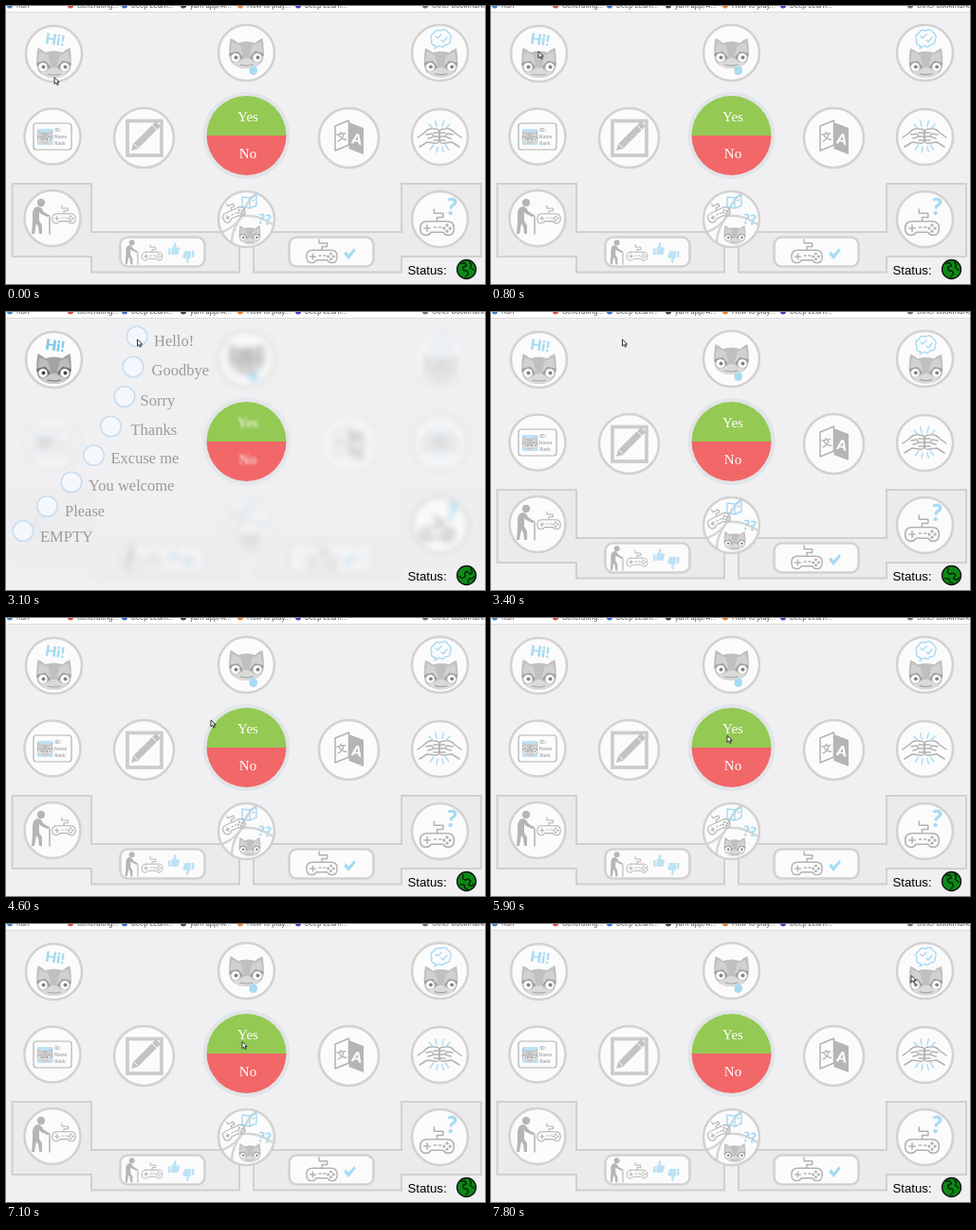
An HTML page for the animation above (8000 ms loop, 505 px wide and 294 px high).

```html
<!DOCTYPE html>
<html lang="en">
<head>
<meta charset="utf-8">
<title>Conversation board</title>
<style>
html, body { margin: 0; width: 100%; height: 100%; overflow: hidden; background: #f0f0f2; }
svg { display: block; width: 505px; height: 294px; }
.art { opacity: .65; }
.blurred .art { opacity: .8; }
.active .art { opacity: 1; }
.line { fill: none; stroke: #8c8c8c; stroke-width: 1.5; stroke-linecap: round; stroke-linejoin: round; }
.blue { fill: #7cc9ef; }
.blueLine { fill: none; stroke: #7cc9ef; stroke-width: 1.4; stroke-linecap: round; stroke-linejoin: round; }
.gray { fill: #909090; }
.ring { fill: #fbfbfb; stroke: #d2d2d2; stroke-width: 2.6; }
.panel { fill: #ebebed; stroke: #d0d0d0; stroke-width: 2; }
.menu { font: 16.5px "Liberation Serif", serif; fill: #9b9b9b; }
.menu circle { fill: #f4f7fb; stroke: #c8ddef; stroke-width: 1.5; }
.answer { font: 15px "Liberation Serif", serif; fill: #fff; text-anchor: middle; }
.bold { font-family: Lato, sans-serif; font-weight: 900; }
.glyph { font-family: "Noto Sans CJK SC", "Noto Sans CJK", sans-serif; font-weight: 700; fill: #909090; }
.white { fill: #fff; }
</style>
</head>
<body>
<svg viewBox="0 0 505 294">
  <defs>
    <g id="face">
      <path fill="#a2a2a2" d="M-17-16Q-12-14-9-11Q0-14 9-11Q12-14 17-16Q19-5 18 4Q17 11 10 14Q0 18-10 14Q-17 11-18 4Q-19-5-17-16Z"/>
      <path fill="#bcbcbc" d="M-15-12L-6-8L-3 4L-9-2L-17-1ZM15-12L6-8L3 4L9-2L17-1Z"/>
      <path fill="#707070" d="M-18 0L-9-2L-4 4L-5 7L-9 2L-18 3ZM18 0L9-2L4 4L5 7L9 2L18 3Z"/>
      <path fill="#c9c9c9" d="M-4 6Q0 4 4 6Q9 11 15 9Q10 17 0 16Q-10 17-15 9Q-9 11-4 6Z"/>
      <path fill="none" stroke="#777" stroke-width="1.2" d="M-7 12Q0 14 7 12"/>
      <g fill="#fff"><circle cx="-11.500" cy="4.500" r="4.500"/><circle cx="11.500" cy="4.500" r="4.500"/></g>
      <g fill="#444"><circle cx="-11" cy="4.500" r="2"/><circle cx="12" cy="4.500" r="2"/></g>
    </g>
    <g id="pad" class="line">
      <path d="M-10-6H10Q17-6 17 1Q17 8 11 8Q8 8 6 5H-6Q-8 8-11 8Q-17 8-17 1Q-17-6-10-6ZM0-6V-10H6V-14H-3V-18"/>
      <path d="M-13 1H-7M-10-2V4M-3 0H-1M2 0H4"/>
      <circle cx="10" cy="-2" r=".8"/><circle cx="13" cy="1" r=".8"/><circle cx="10" cy="4" r=".8"/><circle cx="7" cy="1" r=".8"/>
    </g>
    <g id="man">
      <circle class="gray" cx="1" cy="-14" r="4.200"/>
      <path class="gray" d="M-8-3Q-7-10-2-10Q2-9 3-5L9-1L8 1L1-2L-1-4V5L2 10V19H-1L-2 11L-4 8L-6 19H-9L-8 6Z"/>
      <path class="line" d="M7 0Q10-2 10 2V19"/>
    </g>
    <path id="thumb" class="blue" opacity=".75" d="M-7-1H-4V7H-7ZM-3-1L0-4V-8Q3-9 3-5L2-2H6Q8-1 7 1L5 7H-3Z"/>
    <path id="check" class="blue" d="M-7 0L-4-3L-1 1L6-7L8-4L-1 7Z"/>
  </defs>

  <rect width="505" height="6" fill="#fff"/>
  <path d="M0 6.500H505" stroke="#dcdcde"/>
  <g id="bookmarks" font-family="Roboto, sans-serif" font-size="7.700" fill="#555"></g>
  <g id="board"></g>

  <g>
    <circle id="halo" cx="253.500" cy="137" r="46" fill="#e1e5e8"/>
    <path d="M211.500 137A42 42 0 0 1 295.500 137Z" fill="#94c954"/>
    <path d="M211.500 137A42 42 0 0 0 295.500 137Z" fill="#f26768"/>
    <text id="yes" class="answer" x="255" y="122">Yes</text>
    <text id="no" class="answer" x="255" y="161">No</text>
  </g>
  <g id="menus"></g>

  <text x="423.500" y="284" font-family="Liberation Sans, sans-serif" font-size="13.200">Status:</text>
  <circle cx="485.500" cy="278.500" r="10" fill="#0b8a14" stroke="#111" stroke-width="1.300"/>
  <g id="globe" fill="none" stroke="#06200a" stroke-width="1.400" stroke-linejoin="round">
    <path d="M-6-6L-2-7L0-4L-4-2L-3 1L1 2L2 5L-1 8M3-8L5-5L4-2L8 1"/>
  </g>
  <g id="cursor">
    <path id="arrow" fill="#fff" stroke="#222" stroke-width=".9" d="M0 0V7L1.700 5.500L2.900 8L4.200 7.400L3 5H5.200Z"/>
    <path id="beam" fill="none" stroke="#222" d="M-1.500 -2H1.500M0-2V4M-1.500 4H1.500"/>
  </g>
</svg>

<script>
const $ = id => document.getElementById(id);
const use = (id, x, y, scale = 1, turn = 0) =>
  `<use href="#${id}" transform="translate(${x} ${y}) rotate(${turn}) scale(${scale})"/>`;
const label = (text, x, y, size, turn = 0, cls = 'blue bold') =>
  `<text class="${cls}" text-anchor="middle" font-size="${size}" transform="translate(${x} ${y}) rotate(${turn})">${text}</text>`;
const path = (cls, d) => `<path class="${cls}" d="${d}"/>`;
const disc = (x, y, r = 29.500) => `<circle class="ring" cx="${x}" cy="${y}" r="${r}"/>`;
const pill = x => `<rect class="ring" x="${x}" y="244.500" width="89" height="31" rx="8"/>`;

const rays = [-40, -15, 15, 40, 145, 165, 190, 215].map(angle =>
  `<path class="blueLine" d="M0-11V-17" transform="translate(457 138) rotate(${angle})"/>`).join('');
const fist = side => `<g transform="translate(457 138) scale(${side} 1)">` +
  path('line', 'M-23 1L-16-4Q-12-9-5-8Q0-8 0-4V3Q0 8-5 7L-13 6L-21 11M0-4H-6M0 0H-7M0 4H-6M-14-2L-8-3Q-5-1-8 1L-12 2') + '</g>';

// Each item: frame shape, artwork, opacity while menu 1 or 2 is open (null keeps it sharp).
const items = [
  [path('panel', 'M6.500 188H90V239H246V281.500H90V265H6.500Z'), '', .28, .28],
  [path('panel', 'M501 188H417V239H261V281.500H417V265H501Z'), '', .28, .28],
  [disc(50.500, 50.500), label('Hi!', 51, 41, 15.500, 8) + use('face', 50.500, 60), null, .85],
  [disc(253.500, 49.500), use('face', 253.500, 50) +
    path('blue', 'M257 65Q265 62 265 68Q265 73 260 73Q255 72 257 65Z'), .8, .85],
  [disc(457.500, 49.500), use('face', 458.500, 60, .97) +
    path('blueLine', 'M453 42Q447 41 449 36Q446 31 451 29Q453 24 458 26Q464 23 466 28Q471 31 468 36Q469 41 463 41Q460 45 457 42L452 45ZM453 32L455 34L459 30M459 36L461 38L465 33'), .3, .3],
  [disc(49, 138), `<rect class="line" x="29" y="124" width="40" height="28" rx="3" style="stroke-width:1.2"/>` +
    `<rect class="blue" x="33" y="130" width="16.500" height="17" rx="1" opacity=".75"/>` + use('face', 41, 139, .45) +
    label('ID:', 54.500, 133, 5, 0, 'gray bold') + label('Name', 57.500, 140, 5, 0, 'gray bold') + label('Rank', 57, 147, 5, 0, 'gray bold'), .38, .35],
  [disc(145.500, 139.500, 31.500), '<rect x="128" y="121.500" width="36" height="36.500" fill="none" stroke="#b4b4b4" stroke-width="3.800"/>' +
    '<path fill="#a6a6a6" d="M132 153L134 146L158 122L163 127L139 151Z"/>' +
    '<path d="M135 146L139 150M154 126L159 131" stroke="#fff"/>', 0, .3],
  [disc(361.500, 139.500, 31.500), path('line', 'M361.500 121L347 127V153L361.500 147Z') +
    path('gray', 'M361.500 123L377 129V157L361.500 151Z') +
    label('文', 354.500, 142, 11, -10, 'glyph') + label('A', 369, 146, 15, 10, 'white bold'), .35, .35],
  [disc(457.500, 138.500), fist(1) + fist(-1) + rays, .5, .5],
  [disc(49, 224.500), use('man', 36, 222) + use('pad', 61, 224, .72), .08, .65],
  [disc(253.500, 225.500), '<path d="M228 239Q243 233 249 221Q253 207 264 198M249 222Q266 220 281 231M249 222Q238 236 238 250" fill="none" stroke="#c2c2c2" stroke-width="2.500"/>' +
    use('pad', 240, 220, .72, -25) + path('blueLine', 'M249 202L257 203L264 200V211L257 214L249 212ZM257 203V214M260 206L262 205') +
    label('??', 272, 231, 15, 8) + use('face', 257, 242, .62), .25, .25],
  [disc(457.500, 225.500), use('pad', 454.500, 234, 1.05) + label('?', 469, 221, 25, 5), .95, .95],
  [pill(120.500), use('man', 132, 260, .7) + use('pad', 154, 264, .64) + use('thumb', 177, 257, .85) + use('thumb', 192.500, 265, -.85), .4, .4],
  [pill(298.500), use('pad', 333, 264, .95) + use('check', 362, 262, .85), .45, .45]
];
$('board').innerHTML = items.map(([frame, art]) => `<g>${frame}<g class="art">${art}</g></g>`).join('');

$('bookmarks').innerHTML = [
  [4, '#4285c4', 'Run'], [68, '#d9534f', 'Generating...'], [125, '#3a6fd8', 'Deep Learn...'],
  [187, '#444', 'yarn app/A...'], [247, '#e8853a', 'How to play...'], [308, '#4a3fc8', 'Deep Learn...'], [442, '#777', 'Other bookmarks']
].map(([x, color, text]) => `<circle cx="${x}" cy="-.5" r="3" fill="${color}"/><text x="${x + 7}" y="2">${text}</text>`).join('');

// Menu entries: dot x, dot y, text x, baseline, text.
const menus = [[
  [138, 26, 156, 36, 'Hello!'], [134, 58, 153.500, 67, 'Goodbye'], [125, 89.500, 141.500, 98.500, 'Sorry'],
  [110.500, 121, 131.500, 129.500, 'Thanks'], [92.500, 151.500, 110.500, 160, 'Excuse me'],
  [69, 180, 87, 188.500, 'You welcome'], [43.500, 205.500, 62, 216, 'Please'], [18, 231.500, 36, 242.500, 'EMPTY']
], [
  [176.500, 105, 134, 110, 'Yes'], [195, 78, 128, 82.500, 'Alright'], [222, 60, 140.500, 53, 'I think so'],
  [253.500, 54, 215, 36.500, 'Confirmed'], [285.500, 60, 304.500, 52.500, 'Ok then'],
  [312.500, 78, 331, 83.500, 'Maybe'], [330.500, 105, 348, 110.500, "I'll think about it"]
]];
$('menus').innerHTML = menus.map(list => `<g class="menu">${list.map(([cx, cy, x, y, text]) =>
  `<circle cx="${cx}" cy="${cy}" r="10.800"/><text x="${x}" y="${y}">${text}</text>`).join('')}</g>`).join('');

// Cursor moves: start time, number of 100 ms steps, destination.
const start = [51, 75.500];
const moves = [
  [100, 5, 51, 48], [700, 2, 50, 48], [2000, 4, 108, 53], [2400, 1, 84, 52], [2700, 5, 138.500, 29],
  [4000, 9, 220, 112], [4900, 9, 249, 124.500], [7300, 6, 443, 54.500]
];
function cursorAt(t) {
  let [x, y] = start;
  for (const [begin, steps, toX, toY] of moves) {
    if (t < begin) break;
    const p = Math.min(1, (Math.floor((t - begin) / 100) + 1) / steps);
    const eased = 1 - (1 - p) ** 2;
    x += (toX - x) * eased;
    y += (toY - y) * eased;
  }
  return [x, y];
}

const menuAt = t => t >= 1700 && t < 3400 ? 1 : t >= 6100 && t < 7100 ? 2 : 0;
const globeTurn = t => menuAt(t) ? 75 : t >= 3400 && t < 5300 ? 150 : 0;
const blur = (element, radius) => { element.style.filter = radius ? `blur(${radius}px)` : 'none'; };

function showMenu(menu) {
  items.forEach((item, i) => {
    const group = $('board').children[i];
    const level = menu ? item[menu + 1] : null;
    group.setAttribute('class', !menu ? '' : level === null ? 'active' : 'blurred');
    blur(group, level === null ? 0 : 3);
    group.style.opacity = level ?? 1;
  });
  [...$('menus').children].forEach((group, i) => { group.style.display = menu === i + 1 ? '' : 'none'; });
  blur($('halo'), menu ? 1.500 : 0);
  blur($('yes'), menu === 1 ? 1.400 : 0);
  blur($('no'), menu ? 1.400 : 0);
  $('arrow').style.display = menu === 2 ? 'none' : '';
  $('beam').style.display = menu === 2 ? '' : 'none';
}

let shown = -1;
const origin = performance.now();
function draw() {
  const t = (performance.now() - origin) % 8000;
  const menu = menuAt(t);
  if (menu !== shown) showMenu(shown = menu);
  $('cursor').setAttribute('transform', `translate(${cursorAt(t)})`);
  $('globe').setAttribute('transform', `translate(485.500 278.500) rotate(${globeTurn(t)})`);
  requestAnimationFrame(draw);
}
draw();
</script>
</body>
</html>
```
